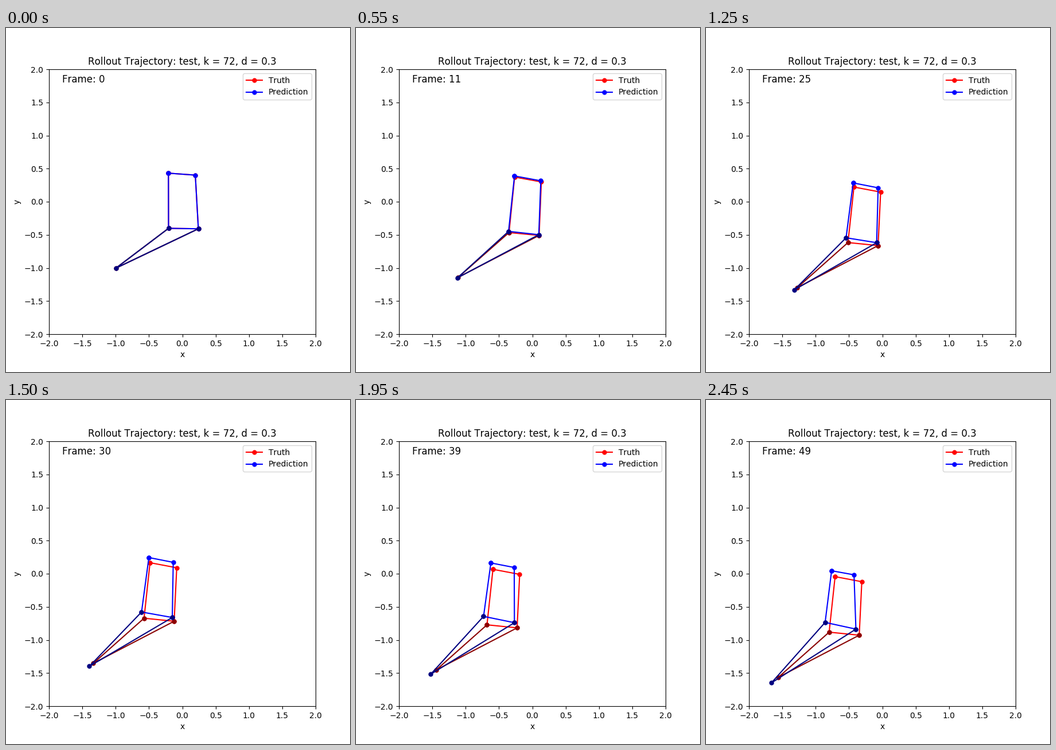
Animation of 600 by 600 pixels, one loop 2.5 s. Source, as a matplotlib script:

```python
import numpy as np
import matplotlib.pyplot as plt
from matplotlib.animation import FuncAnimation

FRAMES = 50
INTERVAL = 50
plt.rcParams["text.kerning_factor"] = 6
plt.rcParams["lines.markersize"] = 5

# Corners in stage pixels: top left, top right, bottom right, bottom left, foot.
START = np.array([(283.3, 253.2), (330.2, 256.6), (335.5, 350.2),
                  (283.5, 349.4), (191.6, 418.9)])
BODY = [0, 1, 2, 3, 0]
LEG = [3, 4, 2]

# Both shapes drift together while the corners settle early on.
DRIFT = np.array([-1.37, 1.28])
SETTLE = np.array([(9, -7.8), (8.7, -2.4), (-1.1, -2.7), (-1.6, -7.2), (1.8, 2)])

# The prediction's final error, and how far it sways on the way there.
ERROR = np.array([(-6.1, -10.3), (-13.6, -12), (-5.8, -10.6), (-7, -17), (-12.1, 9.7)])
SWAY = np.array([(2.1, -2.2), (3, -1.5), (0.6, 0.5), (0.3, 0.5), (1.2, -1.3)])


def truth(t):
    return START + DRIFT * t + SETTLE * (1 - np.exp(-t / 4))


def prediction(t):
    u = t / (FRAMES - 1)
    ease = u * u * (3 - 2 * u)
    bump = 6.75 * u * u * (1 - u)
    return truth(t) + ERROR * ease + SWAY * bump


def to_data(px):
    return (px - [307.5, 303]) / [116.25, -115.5]


fig, ax = plt.subplots(figsize=(6, 6), dpi=100)
ax.set(xlim=(-2, 2), ylim=(-2, 2), xlabel="x", ylabel="y",
       title="Rollout Trajectory: test, k = 72, d = 0.3")
label = ax.text(-1.8, 1.8, "", fontsize=12)


def make_shape(motion, name, bright, dark):
    body, = ax.plot([], [], "o-", color=bright, label=name)
    leg, = ax.plot([], [], "o-", color=dark)
    return motion, body, leg


shapes = [
    make_shape(truth, "Truth", "red", "darkred"),
    make_shape(prediction, "Prediction", "blue", "navy"),
]
ax.legend(loc="upper right")


def update(frame):
    label.set_text(f"Frame: {frame}")
    for motion, body, leg in shapes:
        points = to_data(motion(frame))
        body.set_data(*points[BODY].T)
        leg.set_data(*points[LEG].T)
    return [label] + [line for shape in shapes for line in shape[1:]]


anim = FuncAnimation(fig, update, frames=FRAMES, interval=INTERVAL,
                     repeat=True, repeat_delay=0)
plt.show()
```
